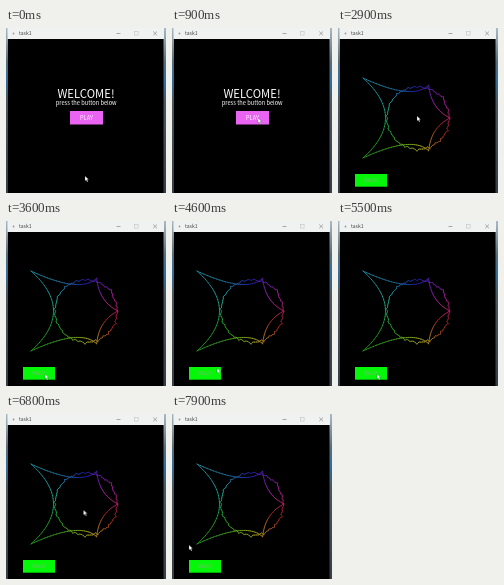
Recreate the animation shown at these times as an HTML page. Size 160x165 px, loop 8 s.

```html
<!DOCTYPE html>
<html lang="en">
<head>
<meta charset="utf-8">
<title>task1</title>
<style>
html, body { margin: 0; width: 100%; height: 100%; overflow: hidden; background: #000; }
svg { display: block; width: 100%; height: 100%; }
text { font-family: "Noto Sans CJK JP", "Noto Sans", sans-serif; }
.mid { text-anchor: middle; }
</style>
</head>
<body>
<svg viewBox="0 0 160 165">
  <defs>
    <linearGradient id="desk" x1="0" y1="0" x2="0" y2="1">
      <stop offset="0" stop-color="#a9bac6"/>
      <stop offset=".2" stop-color="#5a6e7c"/>
      <stop offset=".32" stop-color="#2f6f9c"/>
      <stop offset=".45" stop-color="#4c5860"/>
      <stop offset="1" stop-color="#333e46"/>
    </linearGradient>
  </defs>
  <rect width="160" height="165" fill="url(#desk)"/>
  <rect x="2" y="11" width="155.5" height="154" fill="#000"/>
  <rect x="1.5" width="156.5" height="11" fill="#f0f1f1"/>
  <circle cx="7.5" cy="5.5" r=".9" fill="#9a9a9a"/>
  <text x="13" y="7.4" font-size="5" fill="#444">task1</text>
  <g fill="none" stroke="#777" stroke-width=".6">
    <path d="M110.5 5.5h4M147.2 3.5l3.8 3.8M151 3.5l-3.8 3.8"/>
    <rect x="128.5" y="3.5" width="3.6" height="3.6" stroke="#c4c4c4"/>
  </g>

  <g id="menu">
    <g id="words" fill="#fff">
      <text class="mid" x="80" y="69.8" font-size="11.3">WELCOME!</text>
      <text class="mid" x="80.2" y="77" font-size="5.7">press the button below</text>
    </g>
    <rect x="64" y="83" width="33" height="13.5" fill="#e964f3"/>
    <rect id="edge" x="64" y="83" width="1" height="13.5" fill="#eea04a"/>
    <text id="label" class="mid" x="80.5" y="92" font-size="5.6" fill="#fff">PLAY</text>
  </g>

  <g id="drawing">
    <g id="lines" fill="none" stroke-width=".7" stroke-linecap="round"></g>
    <rect x="17" y="146" width="32" height="12.7" fill="#06f60a"/>
    <text class="mid" x="33" y="154.4" font-size="5.4" fill="#70bd68">BACK</text>
  </g>

  <path id="cursor" d="M0 0V5L1.2 4L2.1 5.9L3 5.4L2.2 3.6H3.7Z" fill="#fff" stroke="#222" stroke-width=".25"/>
</svg>
<script>
const LOOP = 8000, CX = 80, CY = 90, RADIUS = 31;
const $ = id => document.getElementById(id);
const polar = (degrees, r) => {
  const a = degrees * Math.PI / 180;
  return [CX + r * Math.cos(a), CY + r * Math.sin(a)];
};

let seed = 7;
const random = () => (seed = seed * 16807 % 2147483647) / 2147483647;

// Hue follows the angle around the centre.
function trace(points) {
  for (let i = 1; i < points.length; i++) {
    const [x0, y0] = points[i - 1], [x1, y1] = points[i];
    const turn = Math.atan2((y0 + y1) / 2 - CY, (x0 + x1) / 2 - CX);
    const hue = (turn * 180 / Math.PI + 333) % 360;
    const line = document.createElementNS("http://www.w3.org/2000/svg", "path");
    line.setAttribute("d", `M${x0} ${y0}L${x1} ${y1}`);
    line.setAttribute("stroke", `hsl(${hue} 68% 43%)`);
    $("lines").append(line);
  }
}

function arc(a, c, b, steps = 28) {
  return Array.from({ length: steps + 1 }, (_, i) => {
    const t = i / steps, u = 1 - t;
    return a.map((v, k) => u * u * v + 2 * u * t * c[k] + t * t * b[k]);
  });
}

function raggedRing(count) {
  const ring = Array.from({ length: count }, (_, i) =>
    polar(i / count * 360, RADIUS + (random() - .5) * 1.6 + (i % 7 ? 0 : 1.4)));
  return [...ring, ring[0]];
}

// Five points a fifth of a turn apart, the two on the left drawn far out.
const tips = [32, 34.5, 68, 68, 34.5].map((r, i) => polar(i * 72, r));
const pulls = [16, 18, 10, 18, 16].map((r, i) => polar(i * 72 + 36, r));
trace(raggedRing(110));
tips.forEach((tip, i) => trace(arc(tip, pulls[i], tips[(i + 1) % 5])));

function play(id, frames) {
  $(id).animate(frames, { duration: LOOP, iterations: Infinity });
}

// Each [ms, value] holds until the next one.
function hold(id, prop, rows) {
  play(id, [...rows, [LOOP, rows.at(-1)[1]]].map(([ms, value]) =>
    ({ offset: ms / LOOP, [prop]: value, easing: "step-end" })));
}

// Every click swaps the two screens.
const swaps = [0, 1100, 1800, 2900, 5600, 6400];
hold("menu", "opacity", swaps.map((ms, i) => [ms, 1 - i % 2]));
hold("drawing", "opacity", swaps.map((ms, i) => [ms, i % 2]));

// The menu looks duller once it has been left.
const dull = swaps[2];
hold("words", "fill", [[0, "#fff"], [dull, "#a3a3a3"]]);
hold("label", "fill", [[0, "#fff"], [dull, "#bd8fc0"]]);
hold("edge", "opacity", [[0, 0], [dull, 1]]);

// Cursor travel: [start, end, place reached]; it rests in between.
const onPlay = [79, 88], onBack = [39, 153];
const trips = [
  [0, 900, [86, 90]], [1050, 1700, onBack], [1850, 2500, onPlay],
  [2900, 3600, onBack], [3800, 4600, [45, 147]], [4700, 5500, onBack],
  [5600, 6200, onPlay], [6400, 7200, [76, 104]], [7200, 7500, [17, 131]]
];
let place = [79, 148];
const path = [];
const mark = (ms, [x, y]) =>
  path.push({ offset: ms / LOOP, transform: `translate(${x}px, ${y}px)`, easing: "ease-in-out" });
for (const [start, end, goal] of trips) {
  mark(start, place);
  mark(end, place = goal);
}
mark(LOOP, place);
play("cursor", path);
</script>
</body>
</html>
```
